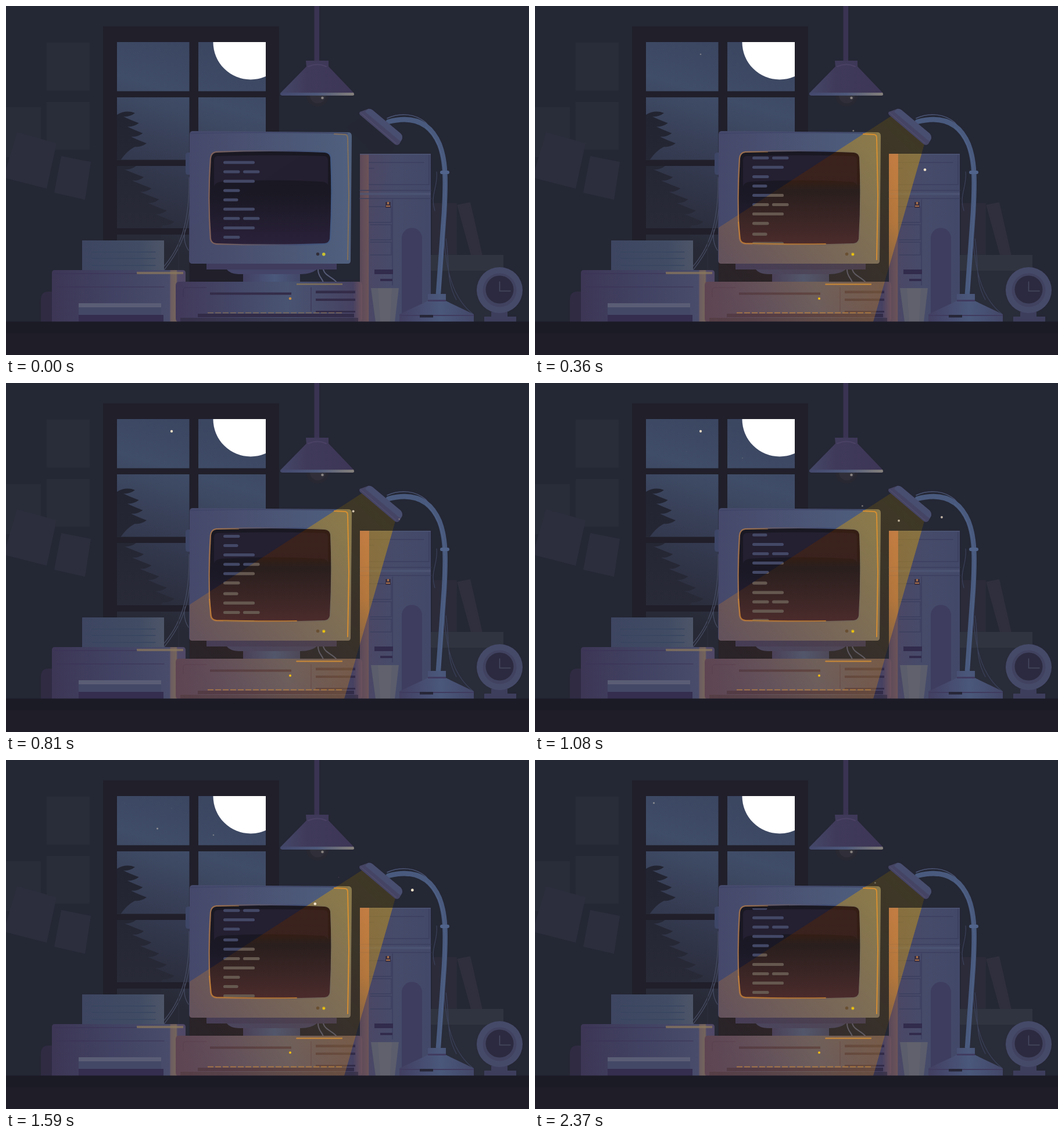
These frames come from a looping animation (900x600 px, 2400 ms). An HTML page:

```html
<!DOCTYPE html>
<html lang="en">
<head>
<meta charset="utf-8">
<title>Night desk</title>
<style>
  html, body { margin: 0; width: 100%; height: 100%; overflow: hidden; background: #242734; }
  svg { display: block; width: 100vw; height: 100vh; }
  .line { fill: none; stroke-linecap: round; }
</style>
</head>
<body>
<svg viewBox="0 0 900 600">
  <defs>
    <linearGradient id="sky" gradientUnits="userSpaceOnUse" x1="310" y1="62" x2="210" y2="400">
      <stop stop-color="#3b4661"/><stop offset=".25" stop-color="#404d68"/>
      <stop offset=".6" stop-color="#343a50"/><stop offset="1" stop-color="#272935"/>
    </linearGradient>
    <linearGradient id="leaf" gradientUnits="userSpaceOnUse" x1="0" y1="184" x2="0" y2="382">
      <stop stop-color="#222431"/><stop offset="1" stop-color="#292a38"/>
    </linearGradient>
    <linearGradient id="shade"><stop stop-color="#44486a"/><stop offset=".35" stop-color="#403a5a"/><stop offset="1" stop-color="#3d3656"/></linearGradient>
    <linearGradient id="rim"><stop stop-color="#43486c"/><stop offset=".5" stop-color="#4d587a"/><stop offset="1" stop-color="#85807b"/></linearGradient>
    <linearGradient id="printer">
      <stop stop-color="#3d3655"/><stop offset=".45" stop-color="#414263"/><stop offset=".88" stop-color="#494c6a"/>
      <stop offset=".89" stop-color="#6d5d60"/><stop offset=".93" stop-color="#74645c"/><stop offset=".94" stop-color="#514a68"/><stop offset="1" stop-color="#4f4765"/>
    </linearGradient>
    <linearGradient id="sheet"><stop stop-color="#3d4560"/><stop offset=".7" stop-color="#414c64"/><stop offset="1" stop-color="#4d5568"/></linearGradient>
    <linearGradient id="tower">
      <stop stop-color="#5a4859"/><stop offset=".12" stop-color="#6b5359"/><stop offset=".13" stop-color="#4a4765"/>
      <stop offset=".5" stop-color="#464b6a"/><stop offset="1" stop-color="#424868"/>
    </linearGradient>
    <linearGradient id="shell"><stop stop-color="#45486a"/><stop offset=".5" stop-color="#4b5474"/><stop offset="1" stop-color="#4f607f"/></linearGradient>
    <linearGradient id="bezel"><stop stop-color="#80625c"/><stop offset=".25" stop-color="#665b66"/><stop offset=".7" stop-color="#434e73"/><stop offset="1" stop-color="#435a83"/></linearGradient>
    <linearGradient id="screen" x2="0" y2="1"><stop stop-color="#191822"/><stop offset=".45" stop-color="#1a1824"/><stop offset="1" stop-color="#2a213b"/></linearGradient>
    <linearGradient id="metal"><stop stop-color="#423f62"/><stop offset=".55" stop-color="#4a587b"/><stop offset="1" stop-color="#434768"/></linearGradient>
    <linearGradient id="case">
      <stop stop-color="#42395b"/><stop offset=".3" stop-color="#444668"/><stop offset=".6" stop-color="#495473"/>
      <stop offset=".95" stop-color="#464162"/><stop offset="1" stop-color="#6b515b"/>
    </linearGradient>
    <linearGradient id="haze" gradientUnits="userSpaceOnUse" x1="645" y1="215" x2="370" y2="500">
      <stop stop-color="#8c6900" stop-opacity=".26"/><stop offset=".5" stop-color="#8c5a00" stop-opacity=".2"/>
      <stop offset="1" stop-color="#8c4a10" stop-opacity=".09"/>
    </linearGradient>
    <linearGradient id="warm" gradientUnits="userSpaceOnUse" x1="590" y1="260" x2="330" y2="500">
      <stop stop-color="#cda02d" stop-opacity=".4"/><stop offset="1" stop-color="#b8704a" stop-opacity=".2"/>
    </linearGradient>
    <linearGradient id="reflection" x2="0" y2="1">
      <stop stop-color="#5a2600" stop-opacity=".42"/><stop offset=".32" stop-color="#5a2600" stop-opacity=".4"/>
      <stop offset=".42" stop-color="#52300c" stop-opacity=".28"/><stop offset="1" stop-color="#8f400c" stop-opacity=".33"/>
    </linearGradient>
    <linearGradient id="strip" x2="0" y2="1"><stop stop-color="#e8854a" stop-opacity=".55"/><stop offset=".6" stop-color="#e8853a" stop-opacity=".4"/><stop offset="1" stop-color="#e8853a" stop-opacity="0"/></linearGradient>
    <path id="body" d="M321,215L589,217Q595,217 595,224L593,438Q593,443 588,443L321,443Q315,443 315,437L316,221Q316,215 321,215Z"/>
    <path id="box" d="M298,474H607Q613,474 613,480V537Q613,543 607,543H298Q292,543 292,537V480Q292,474 298,474Z"/>
    <path id="cabinet" d="M609,254H731V543H609Z"/>
    <path id="glass" d="M362,252Q455,248 548,252Q557,253 558,261Q561,330 557,400Q556,407 548,408Q455,411 362,408Q354,407 353,400Q348,330 353,262Q354,253 362,252Z"/>
    <path id="edge" d="M565,220L584,221Q588,222 588,227L590,325 588,436"/>
    <path id="vents" stroke-dasharray="10 3" stroke-linecap="butt" stroke-width="1.500" d="M347,527.500H580"/>
    <path id="cone" d="M613,189L670,238 582,543H292V474H316V381Z"/>
    <path id="panes" d="M191,62H315.500V146.500H191ZM331,62H447V146.500H331ZM191,157H315.500V264.500H191ZM331,157H447V264.500H331ZM191,275H315.500V382H191ZM191,393H315.500V500H191Z"/>
    <clipPath id="inPanes"><use href="#panes"/></clipPath>
    <clipPath id="inGlass"><use href="#glass"/></clipPath>
    <clipPath id="inCode"><path d="M360,255H552V410H360Z"/></clipPath>
    <clipPath id="inCone"><use href="#cone"/></clipPath>
    <mask id="offGlass" maskUnits="userSpaceOnUse" x="0" y="0" width="900" height="600">
      <path fill="#fff" d="M0,0H900V600H0Z"/><use href="#glass"/>
    </mask>
  </defs>

  <path fill="#242734" d="M0,0H900V600H0Z"/>
  <g fill="#292c39">
    <path d="M70,63H144V145.500H70ZM70,165H144V247H70ZM0,174H60V260H0Z"/>
    <path fill="#2c2e3d" d="M19,217L87,236 70,314 -4,295ZM95,258L146,268 136,333 83,321Z"/>
  </g>

  <!-- window -->
  <path fill="#201f2a" d="M167,35H470V543H167Z"/>
  <use href="#panes" fill="url(#sky)"/>
  <g clip-path="url(#inPanes)">
    <circle cx="421" cy="62" r="64.500" fill="#fff"/>
    <path id="trees" fill="url(#leaf)"/>
  </g>

  <!-- hanging lamp -->
  <circle cx="536" cy="154" r="19" fill="#282832"/>
  <path fill="#302f39" d="M523,154A13.500,13.500 0 0 0 550,154Z"/>
  <circle cx="544.500" cy="158" r="2.300" fill="#85807f"/>
  <path fill="#3a3352" d="M530.500,0H539V96H530.500Z"/>
  <path fill="url(#shade)" d="M516,94H555V104L599,150H472L517,104Z"/>
  <path class="line" stroke="#4b4265" stroke-width="2" d="M520,104Q536,97 551,104"/>
  <path fill="url(#rim)" d="M473,149H598Q601,154 596,154H475Q470,153 473,149Z"/>

  <!-- books and shelf -->
  <path fill="#2b2b3a" d="M733,339H776V430H733Z"/>
  <path fill="#2f2f3d" d="M778,343L798,339 818,427 802,430Z" stroke="#2f2f3d" stroke-linejoin="round" stroke-width="3"/>
  <path fill="#292c39" d="M731,455H836V543H731Z"/>
  <path fill="#303440" d="M731,428H856V455H731Z"/>

  <!-- loose cables -->
  <g class="line" stroke="#454a60" stroke-width="1.300">
    <path d="M315,295C316,370 302,415 268,452M316,350C311,395 295,425 272,454M308,385Q304,405 314,420"/>
    <path stroke="#2d303d" d="M297,395V455"/>
    <path stroke="#565b76" stroke-width="2" d="M537,453C537,466 545,468 546,476M546,453C549,464 562,466 569,475"/>
  </g>

  <!-- printer -->
  <path fill="#302b43" d="M80,491H73Q60,491 60,505V543H80Z"/>
  <path fill="url(#sheet)" d="M131,403H272V455H131Z"/>
  <path class="line" stroke="#394560" stroke-width="1.500" d="M148,423H257M148,434H257M148,446H257"/>
  <path fill="url(#printer)" d="M84,454H304Q309,454 309,459V543H79V459Q79,454 84,454Z"/>
  <path fill="#8d795c" d="M225,457H305V461H225Z" opacity=".7"/>
  <path class="line" stroke="#3a3357" stroke-width="1.200" d="M88,483H272M84,460H225"/>
  <path fill="#5a5d75" d="M125,511H267V518H125Z"/>
  <path fill="#434866" d="M125,518H267V531H125Z"/>
  <path fill="#352e4f" d="M125,531H271V543H125Z"/>

  <!-- tower -->
  <use href="#cabinet" fill="url(#tower)"/>
  <path class="line" stroke="#3d3f5f" stroke-width="1.500" d="M625,269H719M625,279H633M625,307H728V256M609,317H731M609,331H731M665,333V480M625,345H663V372H625M627,376H663V402H627M627,406H663V428H627"/>
  <path fill="#4d5676" d="M609,321H731V325H609ZM609,254H731V256H609Z" opacity=".7"/>
  <path fill="#3e3d5f" d="M681,543V399A17.500,17.500 0 0 1 716,399V543Z"/>
  <path fill="#322b4c" d="M634,453H666V461H634ZM644,469H665V473H644Z"/>
  <path fill="#392f42" d="M653,337H662V347H653Z"/>
  <path fill="#a66f49" d="M656,337H659V341H656ZM654,343H661V345H654Z"/>

  <!-- monitor -->
  <path fill="#3e4667" d="M316,252H313Q309,252 309,257V285Q309,290 313,290H316Z"/>
  <path fill="url(#metal)" d="M408,458H506V475H408Z"/>
  <path fill="#434467" d="M380,453H535Q524,461 508,461H400Q385,460 380,453Z"/>
  <path fill="#3f3c5e" d="M345,442H569V453H345Z"/>
  <use href="#body" fill="url(#shell)"/>
  <path class="line" stroke="#3f4568" stroke-width="1.500" d="M318,219Q455,216 588,219"/>
  <use href="#edge" class="line" stroke="#80705f" stroke-width="2"/>
  <use href="#glass" stroke="url(#bezel)" stroke-width="4.500"/>
  <use href="#glass" fill="url(#screen)"/>
  <path clip-path="url(#inGlass)" fill="#241f31" d="M363,258Q455,255 548,258Q554,259 554,265V308Q553,303 543,302Q455,297 371,302Q360,303 358,310V266Q358,259 363,258Z"/>
  <g clip-path="url(#inCode)" fill="#434866"><g id="code"></g></g>
  <circle cx="536.500" cy="426.500" r="2.700" fill="#302d39"/>
  <circle cx="546.800" cy="426.800" r="2.800" fill="#c9c230"/>

  <!-- desktop case -->
  <use href="#box" fill="url(#case)"/>
  <path class="line" stroke="#3a3355" d="M305,500V489Q305,484 310,484H345M525,484V525"/>
  <path fill="#8a7858" d="M500,477H579V479.500H500Z" opacity=".8"/>
  <path fill="#332c49" d="M351,492.500H491V496.500H351ZM533,489.500H601V494H533ZM533,503H601V507H533ZM533,524H601V527H533ZM330,529H599V535H330Z"/>
  <use href="#vents" stroke="#7d6b5c"/>
  <circle cx="489" cy="503" r="2.300" fill="#c08c48"/>
  <path fill="#302a40" d="M300,536H606V543H300Z" opacity=".6"/>

  <!-- cup -->
  <path fill="#5b5d6c" d="M628,485H676L669,543H636Z"/>
  <path fill="#65656d" d="M640,485H664L661,543H644Z" opacity=".6"/>

  <!-- clock -->
  <path fill="#3d3d5c" d="M835,526H863V534H878V543H823V534H835Z"/>
  <circle cx="849.500" cy="488.500" r="39.500" fill="#464a69"/>
  <circle cx="849.500" cy="488.500" r="29" fill="#40425f"/>
  <circle cx="849.500" cy="487.500" r="24" fill="#2c2a40"/>
  <path class="line" stroke="#454a5f" stroke-width="1.500" d="M849.500,474V490H868"/>

  <!-- light of the desk lamp -->
  <g id="beam">
    <g clip-path="url(#inCone)">
      <g mask="url(#offGlass)">
        <use href="#cone" fill="url(#haze)"/>
        <g fill="url(#warm)"><use href="#body"/><use href="#box"/><use href="#cabinet"/></g>
      </g>
      <use href="#glass" fill="url(#reflection)"/>
      <g clip-path="url(#inCode)" fill="#65584f"><use href="#code"/></g>
      <path fill="url(#strip)" d="M609,254H625V450H609Z"/>
    </g>
    <g class="line" stroke="#e8952f" stroke-width="2">
      <use href="#edge" opacity=".75"/>
      <path d="M350,372Q352,392 353,400Q354,407 362,408Q440,410 500,409" opacity=".6"/>
      <path d="M350,372Q349,330 352,262Q353,252 362,251H400" opacity=".3"/>
      <path d="M500,478.500H578" opacity=".6"/>
      <use href="#vents" opacity=".4"/>
      <path stroke-width="3" d="M489,503h.1M547,427h.1" stroke="#ffd000"/>
    </g>
  </g>

  <!-- desk lamp -->
  <g class="line">
    <path stroke="#3b415a" stroke-width="1.200" d="M741,285C744,310 729,325 738,352M753,390C757,450 766,500 803,529M757,400C764,440 756,470 775,505"/>
    <path stroke="#4a5474" stroke-width="1.500" d="M656,193C680,182 705,186 722,200C745,225 756,260 757,284"/>
    <path stroke="#495a7e" stroke-width="8.500" d="M658,199C700,188 730,200 746,238C757,266 757,300 754,355L744,494"/>
    <path stroke="#56698f" stroke-width="1.500" d="M722,208C750,233 758,275 756,340L747,490" opacity=".5"/>
    <path stroke="#50638a" stroke-width="6" d="M750,286H760"/>
  </g>
  <path fill="#454464" d="M609,187Q606,182 612,181L623,177Q627,176 631,179L679,219Q684,224 681,230L677,237Q673,241 668,237Z"/>
  <path fill="#4d587a" d="M623,177Q627,176 631,179L679,219Q684,224 681,230L679,233L618,182Z" opacity=".5"/>
  <path class="line" stroke="#504c6c" stroke-width="1.500" d="M611,184L671,236"/>
  <path fill="url(#metal)" d="M726,495H757V507L805,530V543H677V530L726,507Z"/>
  <path fill="#403c60" d="M677,531H805V533H677ZM726,505H757V508H726Z"/>
  <path fill="#262638" d="M712,531H735V535.500H712Z"/>

  <!-- table -->
  <path fill="#1b1b26" d="M0,542.500H900V563H0Z"/>
  <path fill="#1f1d28" d="M0,563H900V600H0Z"/>

  <g id="dots" fill="#f7e6cb"></g>
</svg>
<script>
const LOOP = 2400, SCROLL = 163;
const byId = id => document.getElementById(id);
const code = byId("code"), beam = byId("beam");

function add(parent, name, attrs) {
  const node = document.createElementNS("http://www.w3.org/2000/svg", name);
  setAll(node, attrs);
  return parent.appendChild(node);
}

function setAll(node, attrs) {
  for (const key in attrs) node.setAttribute(key, attrs[key]);
}

// Fronds step down the trunk, each reaching a little further right.
function tree(top, bottom, firstTip, lastTip, fronds, end) {
  let d = `M191,${top + 3}`;
  for (let i = 0; i < fronds; i++) {
    const k = i / (fronds - 1);
    const x = firstTip + (lastTip - firstTip) * k, y = top + (bottom - top) * k;
    d += `Q${x - 16},${y - 6} ${x},${y}Q${x - 9},${y + 7} ${x - 20},${y + 6}`;
  }
  return `${d}Q${end}V400H191Z`;
}
byId("trees").setAttribute("d",
  tree(184, 236, 222, 242, 4, "208,249 198,264") + tree(275, 371, 224, 290, 6, "268,378 266,384"));

// Two copies of the ten lines make the scroll seamless.
const bar = (x, y, width) => add(code, "rect", { x, y, width, height: 5, rx: 2.5 });
for (let i = 0; i < 20; i++) {
  const row = i % 10, kind = row % 5;
  const y = 266.6 + Math.floor(i / 10) * SCROLL + row * 16.05 + (row === 9 ? 2.5 : 0);
  bar(374, y, [54, 28.5, 54, 28.5, 25.5][kind]);
  if (kind === 1) bar(408, y, 28.5);
}

// A mote glides along a quadratic curve; a star is a mote that stays put.
const mote = (start, life, size, from, via = from, to = from) =>
  ({ start, life, size, from, via, to, node: add(byId("dots"), "circle", {}) });
const motes = [
  mote(120, 1450, 2, [520, 222], [605, 188], [675, 290]),
  mote(100, 560, 2.3, [612, 292], [690, 284], [705, 262]),
  mote(650, 1900, 2.4, [655, 236], [800, 225], [540, 208]),
  mote(1150, 1000, 2.3, [514, 231], [534, 248], [555, 271]),
  mote(1000, 620, 2.2, [562, 213], [567, 207], [573, 201]),
  mote(200, 1440, 2.2, [285, 83]),
  mote(1000, 1300, 1.5, [260.5, 118]),
  mote(1000, 750, 1.6, [357, 129]),
  mote(1500, 1600, 1.5, [204.5, 74])
];

const bezier = (k, a, b, c) => (1 - k) ** 2 * a + 2 * k * (1 - k) * b + k * k * c;
const pulse = (t, center) => Math.max(0, 1 - Math.abs(t - center) / 45);

function draw(now) {
  const t = now % LOOP, p = t / LOOP;
  code.setAttribute("transform", `translate(0 ${1.5 * Math.sin(Math.PI * p) - SCROLL * p})`);
  beam.setAttribute("opacity", Math.min(1, t / 100) - 0.5 * (pulse(t, 510) + pulse(t, 1455)));
  for (const { start, life, size, from, via, to, node } of motes) {
    const k = Math.min(1, Math.max(0, (t - start) / life));
    const r = size * Math.sqrt(Math.max(0, Math.sin(Math.PI * k)));
    setAll(node, {
      cx: bezier(k, from[0], via[0], to[0]),
      cy: bezier(k, from[1], via[1], to[1]),
      r,
      opacity: Math.min(1, r * r / 5)
    });
  }
  requestAnimationFrame(draw);
}
draw(0);
</script>
</body>
</html>
```
